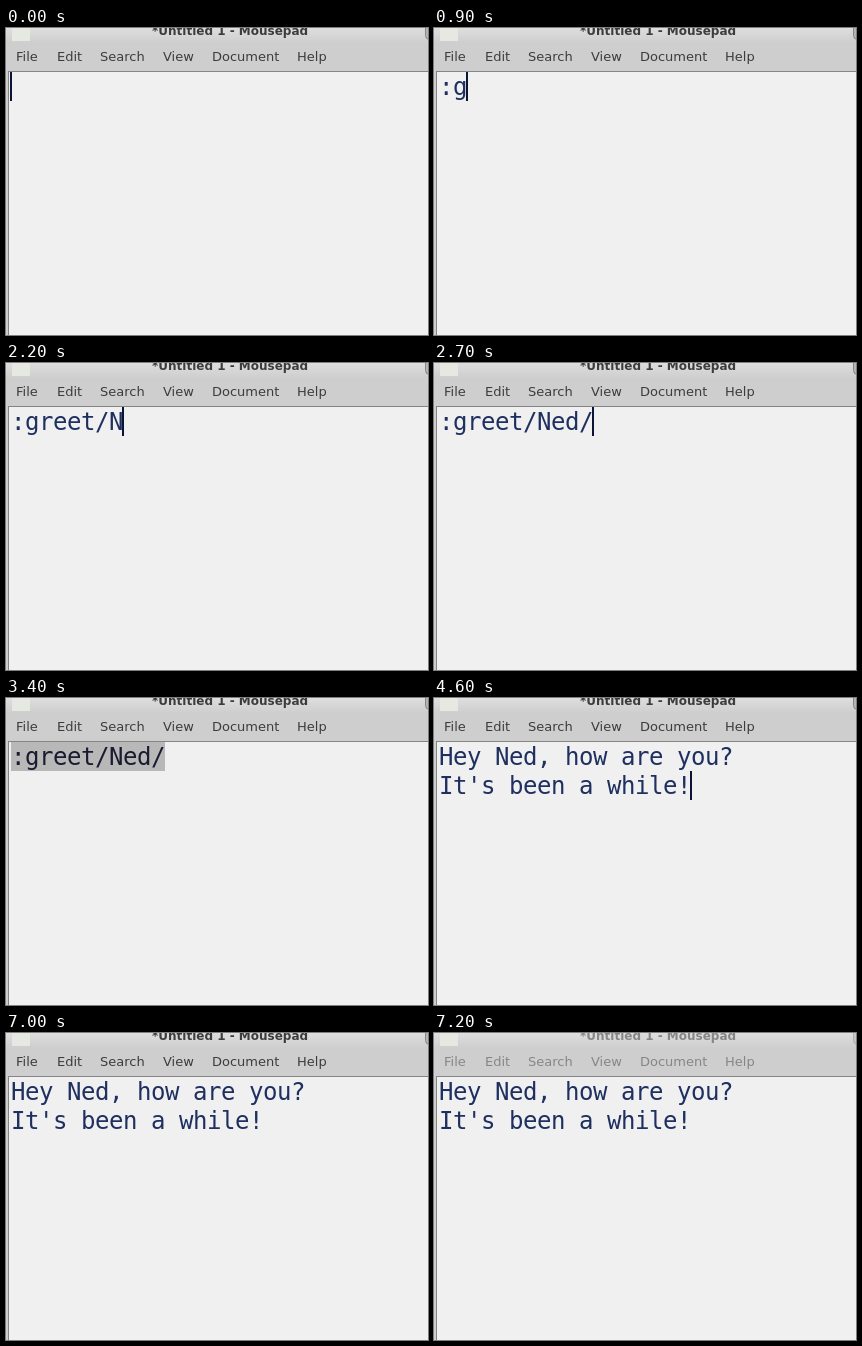
An HTML page for the animation above (7.3 s loop, 422 by 307 pixels).

```html
<!DOCTYPE html>
<html lang="en">
<head>
<meta charset="utf-8">
<title>Text expansion</title>
<style>
  html, body { margin: 0; width: 100%; height: 100%; overflow: hidden; background: #f0f0f0; }
  svg { display: block; }
  .ui { font: 13px "DejaVu Sans", sans-serif; fill: #3c3c3c; }
  .title { font-weight: bold; font-size: 12px; }
  .idle .ui { fill: #868686; }
  .idle .button { opacity: .5; }
  .doc { font: 24px "DejaVu Sans Mono", monospace; fill: #1f3060; }
  .doc.selected { fill: #1a1a30; }
</style>
</head>
<body>
<svg id="stage" width="422" height="307" viewBox="0 0 422 307">
  <defs>
    <linearGradient id="bar" x2="0" y2="1">
      <stop stop-color="#dedede"/>
      <stop offset="1" stop-color="#cecece"/>
    </linearGradient>
  </defs>
  <rect width="422" height="307" fill="#cecece"/>
  <rect width="422" height="15" fill="url(#bar)"/>
  <rect x="6" y="-5" width="18" height="18" fill="#e6e9e2"/>
  <rect class="button" x="419.5" y="-6.5" width="18" height="18" rx="4" fill="#b4b4b4" stroke="#858585"/>
  <text class="ui title" x="146" y="7">*Untitled 1 - Mousepad</text>
  <g class="ui">
    <text x="10" y="33">File</text>
    <text x="51" y="33">Edit</text>
    <text x="94" y="33">Search</text>
    <text x="157" y="33">View</text>
    <text x="206" y="33">Document</text>
    <text x="291" y="33">Help</text>
  </g>
  <rect x="2.5" y="43.5" width="430" height="280" fill="#f0f0f0" stroke="#858585"/>
  <rect id="selection" x="5" y="44" width="154" height="29" fill="#b8b8b8"/>
  <g id="doc" class="doc"><text y="67"></text><text y="96"></text></g>
  <rect id="caret" width="2" height="29" fill="#0c1436"/>
</svg>
<script>
const LOOP = 7300, LEFT = 5, TOP = 44, CHAR = 14, LINE = 29;
const SELECT = 3400, EXPAND = 4600, IDLE = 7200;
const command = ":greet/Ned/";
const keyTimes = [600, 900, 1000, 1200, 1300, 1500, 1800, 2200, 2300, 2400, 2700];
const greeting = ["Hey Ned, how are you?", "It's been a while!"];

const [stage, selection, doc, caret] =
  ["stage", "selection", "doc", "caret"].map(id => document.getElementById(id));
const show = (el, on) => el.setAttribute("visibility", on ? "visible" : "hidden");

function setLine(el, text) {
  if (el.textContent === text) return;
  el.textContent = text;
  el.setAttribute("x", [...text].map((_, i) => LEFT + CHAR * i).join(" "));
}

function draw(t) {
  const typed = command.slice(0, keyTimes.filter(k => k <= t).length);
  const lines = t < EXPAND ? [typed, ""] : greeting;
  lines.forEach((text, i) => setLine(doc.children[i], text));

  const selected = t >= SELECT && t < EXPAND;
  show(selection, selected);
  doc.classList.toggle("selected", selected);
  stage.classList.toggle("idle", t >= IDLE);

  const row = t < EXPAND ? 0 : 1;
  caret.setAttribute("x", LEFT - 1 + CHAR * lines[row].length);
  caret.setAttribute("y", TOP + LINE * row);
  show(caret, !selected && !(t >= 5800 && t < 6200) && t < 7000);
}

const start = performance.now();
function tick() {
  draw((performance.now() - start) % LOOP);
  requestAnimationFrame(tick);
}
tick();
</script>
</body>
</html>
```
